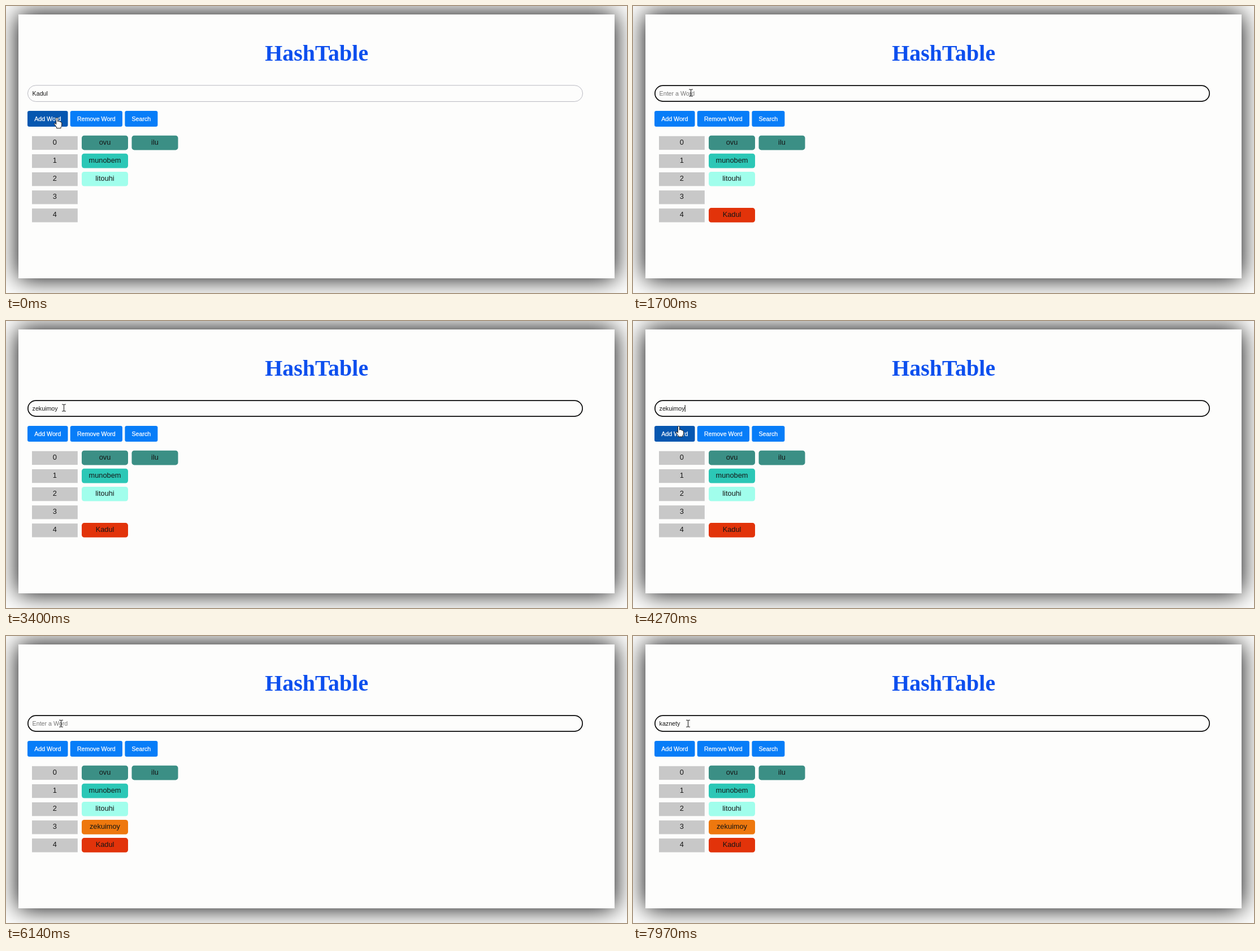
These frames come from a looping animation (1099x509 px, 8 s). An HTML page:

```html
<!DOCTYPE html>
<html lang="en">
<head>
<meta charset="utf-8">
<title>HashTable</title>
<style>
  html, body { margin: 0; width: 100%; height: 100%; overflow: hidden; background: #fefefd; }
  .card { position: absolute; left: 22px; top: 15px; width: 1055px; height: 468px;
    background: #fdfdfc; box-shadow: 0 0 40px #000; }
  svg { position: absolute; left: 0; top: 0; }
  text { font: 12.8px "Liberation Sans", Arial, sans-serif; fill: #151515; text-anchor: middle; }
  .title { font: bold 40px "Liberation Serif", "Times New Roman", serif; fill: #0d4fee; }
  .small { font-size: 10.667px; }
  .button { fill: #fff; stroke: #fff; stroke-width: .25px; }
  #value { text-anchor: start; }
</style>
</head>
<body>
<div class="card"></div>
<svg id="stage" width="1099" height="509" viewBox="0 0 1099 509">
  <text class="title" x="549.7" y="96.5">HashTable</text>
  <rect id="field" fill="#fdfdfc"/>
  <text id="value" class="small" x="46.6" y="158.7"></text>
  <rect id="caret" y="149" width="1" height="12"/>
  <g id="buttons"></g>
  <g id="table"></g>
  <g id="pointer">
    <g id="beam" fill="none" stroke="#222" stroke-width="1.1">
      <path d="M-3.5-6H-1.2L0-5.2 1.2-6H3.5M-3.5 6H-1.2L0 5.2 1.2 6H3.5M0-5.2V5.2"/>
    </g>
    <path id="hand" fill="#fff" stroke="#111" stroke-width="1" stroke-linejoin="round"
      d="M-1.6 1Q0-.8 1.4 1V7.2L2 6.2Q3.8 5.6 4.3 7.3 6 6.6 6.6 8.2 8 7.8 8.4 9.5V14Q8 16 6.8 17V19H-.7V17.3L-4.8 11.7Q-5.4 9.7-3.6 9.9L-1.6 12Z"/>
    <path id="arrow" fill="#fff" stroke="#111" stroke-width=".9" d="M0 0V14L3.2 11 5.4 16 7.7 15 5.5 10.2H10Z"/>
  </g>
</svg>
<script>
const $ = id => document.getElementById(id);
const LOOP = 8000, PITCH = 32.1;

function add(parent, tag, attrs, text = "") {
  const el = document.createElementNS("http://www.w3.org/2000/svg", tag);
  set(el, attrs);
  el.textContent = text;
  return parent.appendChild(el);
}

function set(el, attrs) {
  for (const key in attrs) el.setAttribute(key, attrs[key]);
}

function show(el, on) { el.style.display = on ? "" : "none"; }

const buttons = [["Add Word", 38, 71.5], ["Remove Word", 113.7, 92.3], ["Search", 210.4, 58]]
  .map(([label, x, width]) => {
    const rect = add($("buttons"), "rect", { x, y: 186, width, height: 28, rx: 3.2 });
    add($("buttons"), "text", { class: "small button", x: x + width / 2, y: 204 }, label);
    return { rect, x, width };
  });

function addWord(row, column, word, fill) {
  const group = add($("table"), "g", {}), x = 134 + column * 88.5, y = row * PITCH;
  add(group, "rect", { x, y: 229.7 + y, width: 82, height: 25.7, rx: 4.5, fill });
  add(group, "text", { x: x + 41, y: 245.8 + y }, word);
  return group;
}

for (let row = 0; row < 5; row++) {
  add($("table"), "rect", { x: 46, y: 230.8 + row * PITCH, width: 80.8, height: 24.3, fill: "#c8c8c8" });
  add($("table"), "text", { x: 86.3, y: 245.8 + row * PITCH }, row);
}

const FIRST = "Kadul", SECOND = "zekuimoy", THIRD = "kaznety";
addWord(0, 0, "ovu", "#3b8f85");
addWord(0, 1, "ilu", "#3b8f85");
addWord(1, 0, "munobem", "#2cc7b6");
addWord(2, 0, "litouhi", "#a1feec");
const added = [
  [240, addWord(4, 0, FIRST, "#e2330a")],
  [4700, addWord(3, 0, SECOND, "#ee780e")]
];

// focus, blur and key times of each typing session
const sessions = [
  { word: SECOND, from: 1200, to: 4650, keys: [2050, 2230, 2400, 2520, 2620, 2710, 2800, 2880] },
  { word: THIRD, from: 5600, to: LOOP, keys: [6450, 6620, 6760, 6900, 7060, 7240, 7420] }
];

// start, end, destination of each pointer move
const moves = [
  [400, 850, 102.5, 154],
  [3750, 4450, 76.8, 192.5],
  [5120, 5520, 97.5, 155.3]
];

function pointerAt(t) {
  let x = 90.3, y = 197.8;
  for (const [from, to, toX, toY] of moves) {
    const k = Math.min(1, Math.max(0, (t - from) / (to - from)));
    const ease = k * k * (3 - 2 * k);
    x += (toX - x) * ease;
    y += (toY - y) * ease;
  }
  return { x, y };
}

function drawField(t) {
  const session = sessions.find(s => t >= s.from && t < s.to);
  const current = session || sessions.find(s => t >= s.to && t < s.to + 50);
  const typed = current ? current.keys.filter(k => t >= k) : [];
  const value = current ? current.word.slice(0, typed.length) : t < 240 ? FIRST : "";
  $("value").textContent = value || "Enter a Word";
  $("value").style.fill = value ? "#151515" : "#757575";

  const line = session ? 1.7 : 0.9;
  set($("field"), {
    x: 38 + line / 2, y: 140.3 + line / 2, width: 983 - line, height: 29.6 - line,
    rx: 14.8 - line / 2, stroke: session ? "#080808" : "#b2b2ba", "stroke-width": line
  });

  const since = session ? t - (typed[typed.length - 1] || session.from) : 0;
  show($("caret"), session && since % 1000 < 500);
  $("caret").setAttribute("x", 46.6 + (value ? $("value").getComputedTextLength() : 0));
}

function drawPointer(t) {
  const { x, y } = pointerAt(t);
  const inField = x > 38 && x < 1021 && y > 140 && y < 170;
  let onButton = false;
  for (const b of buttons) {
    const hover = x > b.x && x < b.x + b.width && y > 186 && y < 214;
    b.rect.setAttribute("fill", hover ? "#0657b0" : "#077df8");
    onButton = onButton || hover;
  }
  $("pointer").setAttribute("transform", `translate(${x} ${y})`);
  show($("beam"), inField);
  show($("hand"), onButton);
  show($("arrow"), !inField && !onButton);
}

function draw(now) {
  const t = now % LOOP;
  for (const [time, word] of added) show(word, t >= time);
  drawField(t);
  drawPointer(t);
}

const start = performance.now();
function frame() {
  draw(performance.now() - start);
  requestAnimationFrame(frame);
}
frame();
</script>
</body>
</html>
```
